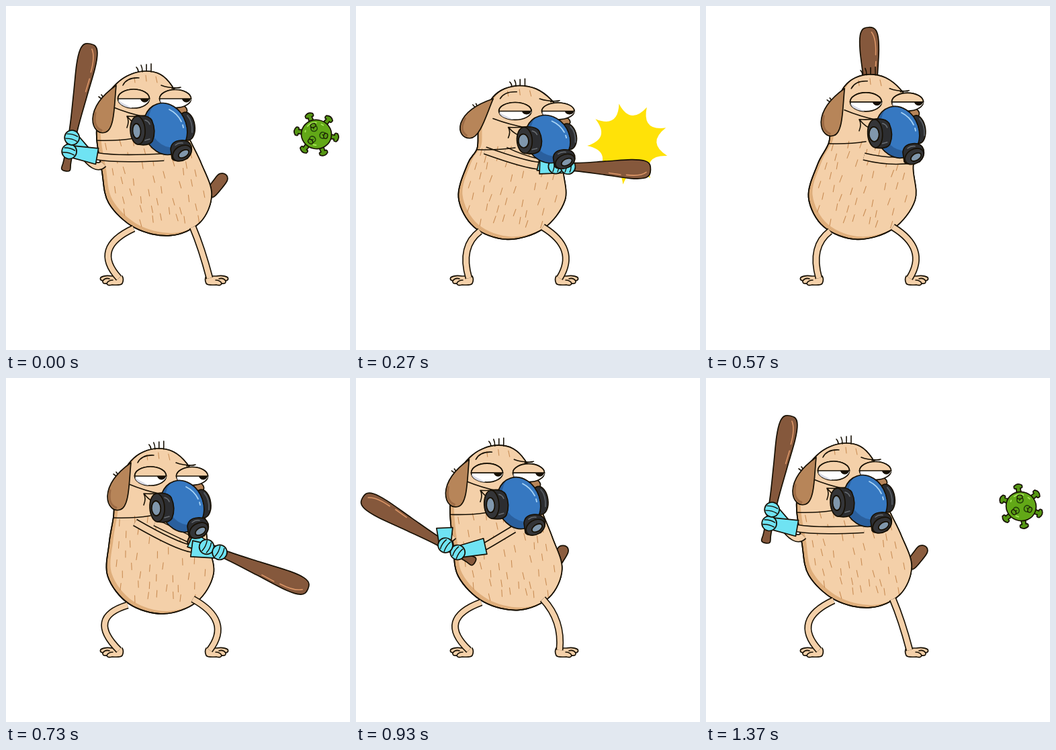
Animation, 512 px wide and 512 px high, one loop 1.41 s. Source, as an HTML page with a canvas:

```html
<!DOCTYPE html>
<html lang="en">
<head>
<meta charset="utf-8">
<title>Batter</title>
<style>
html, body { margin: 0; width: 100%; height: 100%; overflow: hidden; background: #fff; }
canvas { display: block; width: 100vw; height: 100vh; }
</style>
</head>
<body>
<canvas id="stage" width="512" height="512"></canvas>
<script>
const ctx = document.getElementById('stage').getContext('2d');
const LOOP = 1410, RAD = Math.PI / 180;
const INK = '#171004', SKIN = '#f4d0a9', SHADE = '#dfae7b', FUR = '#c98d55';
const BAT = '#85583c', EAR = '#b78559', GLOVE = '#6fe3f3', RUBBER = '#2c2d30', GLASS = '#8097ac';

// time, head shift, crouch, squash, bat angle; the rest of the pose follows from these
const POSES = [
  [0, 0, 0, 0, 79],
  [170, 21, 1, 1, 203],
  [370, 66, .2, 0, 466],
  [570, 48, .6, 0, 452],
  [730, 25, 1, 0, 337.5],
  [930, 5, .4, 0, 150],
  [1080, 0, 0, 0, 79],
  [LOOP, 0, 0, 0, 79]];

// monotone cubic through the poses
function poseAt(t) {
  let i = 0;
  while (i < POSES.length - 2 && t >= POSES[i + 1][0]) i++;
  const a = POSES[i], b = POSES[i + 1], h = b[0] - a[0], u = (t - a[0]) / h, w = 1 - u;
  const slope = (k, c) => POSES[k] && POSES[k + 1]
    ? (POSES[k + 1][c] - POSES[k][c]) / (POSES[k + 1][0] - POSES[k][0]) : 0;
  const tangent = (k, c) => {
    const p = slope(k - 1, c), q = slope(k, c);
    return p * q > 0 ? 2 * p * q / (p + q) : 0;
  };
  const [dx, crouch, squash, phi] = [1, 2, 3, 4].map(c =>
    a[c] * w * w * (1 + 2 * u) + b[c] * u * u * (3 - 2 * u)
    + h * u * w * (w * tangent(i, c) - u * tangent(i + 1, c)));
  const bat = {
    x: 275 - .00253 * (phi - 350) ** 2,
    y: 288 - .18 * (phi - 79) - 46 * Math.exp((79 - phi) / 25),
    angle: -phi * RAD,
    scale: 1 - .27 * squash
  };
  return {
    dx, crouch, squash, bat, lean: dx / 66, dy: 8 * crouch + 27 * squash,
    sx: 1 + .06 * squash, sy: 1 - .15 * squash, behind: phi > 400, reach: ramp(bat.x, 225, 270)
  };
}

function ramp(v, from, to) {
  const u = Math.min(1, Math.max(0, (v - from) / (to - from)));
  return u * u * (3 - 2 * u);
}
const mix = (a, b, u) => a + (b - a) * u;
const mixPoint = (p, q, u) => [mix(p[0], q[0], u), mix(p[1], q[1], u)];
function toward(p, q, d) {
  return mixPoint(p, q, d / (Math.hypot(q[0] - p[0], q[1] - p[1]) || 1));
}
const along = (bat, d) => [
  bat.x + Math.cos(bat.angle) * d * bat.scale,
  bat.y + Math.sin(bat.angle) * d * bat.scale];

function blob(pts) {
  const p = new Path2D(), n = pts.length, g = i => pts[(i + n) % n];
  p.moveTo(...pts[0]);
  for (let i = 0; i < n; i++) {
    const [a, b, c, d] = [g(i - 1), g(i), g(i + 1), g(i + 2)];
    p.bezierCurveTo(b[0] + (c[0] - a[0]) / 6, b[1] + (c[1] - a[1]) / 6,
      c[0] - (d[0] - b[0]) / 6, c[1] - (d[1] - b[1]) / 6, ...c);
  }
  p.closePath();
  return p;
}
function paint(path, fill, width = 1.7) {
  if (fill) { ctx.fillStyle = fill; ctx.fill(path); }
  if (width) { ctx.strokeStyle = INK; ctx.lineWidth = width; ctx.stroke(path); }
}
function oval(x, y, rx, ry, deg, fill, width, from = 0, to = 360) {
  const p = new Path2D();
  p.ellipse(x, y, rx, ry, deg * RAD, from * RAD, to * RAD);
  if (to - from < 360) p.closePath();
  paint(p, fill, width);
}
function line(d, color = INK, width = 1.6) {
  ctx.strokeStyle = color;
  ctx.lineWidth = width;
  ctx.stroke(new Path2D(d));
}
function tube(a, b, c, width) {
  const d = `M${a}Q${b} ${c}`;
  ctx.lineCap = 'butt';
  line(d, INK, width);
  line(d, SKIN, width - 3.2);
  ctx.lineCap = 'round';
}
function within(draw) { ctx.save(); draw(); ctx.restore(); }
function shifted(x, y, draw) {
  within(() => { ctx.translate(x, y); draw(); });
}

function drawBat(bat) {
  shifted(bat.x, bat.y, () => {
    const s = bat.scale;
    ctx.rotate(bat.angle);
    const side = [[-2, 6], [12, 5.5], [60, 6], [110, 10], [155, 14], [178, 13], [188, 7]];
    const edge = k => side.map(([x, y]) => [x * s, y * k]);
    paint(blob([...edge(-1), ...edge(1).reverse()]), BAT);
    line(`M${148 * s} 9Q${172 * s} 11 ${182 * s} 4M${118 * s} 7L${138 * s} 9`, '#dc9667');
  });
}

function drawGlove(wrist, hand) {
  const a = Math.atan2(hand[1] - wrist[1], hand[0] - wrist[0]);
  const off = (p, k) => [p[0] - Math.sin(a) * k, p[1] + Math.cos(a) * k];
  paint(new Path2D(`M${off(wrist, 12)}L${off(hand, 9)}L${off(hand, -8)}L${off(wrist, -12)}Z`), GLOVE);
}
function drawFists(bat) {
  shifted(bat.x, bat.y, () => {
    ctx.rotate(bat.angle);
    for (const d of [26, 47]) {
      const x = d * bat.scale;
      oval(x, 0, 11, 11, 0, GLOVE);
      line(`M${x - 3} -9Q${x - 1} 0 ${x - 4} 8M${x + 4} -8Q${x + 6} 0 ${x + 3} 8`, INK, 1.4);
    }
  });
}

// shoulders and elbows move with the reach; wrists trail the hands on the bat
function armsOf({ bat, reach, squash }) {
  const handA = along(bat, mix(26, 47, reach)), handB = along(bat, mix(47, 26, reach));
  const shoulderA = [mix(235, 192, reach), mix(225, 215, reach)];
  const shoulderB = [mix(145, 222, reach), mix(235, 215, reach)];
  const elbowA = mixPoint(shoulderA, handA, .5);
  elbowA[1] += 8 + 6 * reach - 8 * squash;
  const elbowB = [shoulderB[0] + mix(-12 - 30 * squash, 24, reach), shoulderB[1] + 12];
  return [
    [shoulderB, elbowB, toward(handB, elbowB, 26), handB],
    [shoulderA, elbowA, toward(handA, elbowA, 42), handA]];
}

function drawFoot() {
  paint(new Path2D('M163 402Q160 402 158 402Q147 400 141 404Q139 408 144 409Q143 414 150 413'
    + 'Q151 417 158 415Q171 416 173 413Q176 407 173 402'), SKIN);
  line('M144 409Q148 404 154 406M150 413Q152 408 159 408');
}
function drawLegs({ lean, crouch }) {
  const leg = (hip, knee, ankle) => {
    const bend = [0, 1].map(i => 2 * knee[i] - (hip[i] + ankle[i]) / 2);
    tube(hip, bend, ankle, 11);
  };
  drawFoot();
  within(() => { ctx.translate(471, 0); ctx.scale(-1, 1); drawFoot(); });
  leg([190 - 9 * crouch, 331 + 7 * crouch], [153 + 32 * lean - 18 * crouch, 364], [168, 405]);
  leg([278, 329], [291 + 12 * lean + 18 * crouch, 364], [303, 405]);
}

// skull from the right ear round to the neck, then the belly as part of a sheared ellipse
function bodyOutline({ dx, dy, sx, sy, lean, crouch }) {
  const skull = [[270, 190], [262, 150], [247, 119], [230, 102], [208, 97], [185, 102],
    [165, 115], [147, 138], [137, 165], [135, 198]];
  const top = skull.map(([x, y]) => [
    210 + dx + (x - 210) * sx - dx * .25 * Math.max(0, (140 - y) / 43),
    140 + dy + (y - 140) * sy]);
  const belly = Array.from({ length: 7 }, (_, i) => {
    const a = mix(197 + 18 * lean, -27, i / 6) * RAD, y = 75 * Math.sin(a);
    return [224 + 13 * lean + 81 * Math.cos(a) + (.18 - .36 * lean) * y, 267 + 9 * crouch + y];
  });
  return [...top, ...belly];
}

function drawFur(out, lean) {
  const left = out.slice(9, 13), right = [out[0], out[16], out[15], out[14]];
  const edge = (e, v) => {
    const i = Math.min(2, Math.floor(v));
    return mixPoint(e[i], e[i + 1], v - i);
  };
  let d = '';
  for (let r = 0; r < 8; r++) for (let c = 0; c < 6; c++) {
    const v = .25 + r * .36 + Math.sin(c * 5.1 + r) * .1;
    const u = (c + .5 + (r % 2) * .45 + Math.sin(c * 3 + r * 7) * .15) / 6.4;
    const [x, y] = mixPoint(edge(left, v), edge(right, v), u);
    d += `M${x} ${y - 5}l${2 - 6.6 * lean + Math.sin(r * 3 + c * 2)} 10`;
  }
  line(d, FUR, 1.1);
}

function drawEye(x, y, rx, ry) {
  oval(x, y, rx, ry, 0, '#fff');
  oval(x, y, rx, ry, 0, '#d9dbe6', 0, 95, 170);
  oval(x + 1.5, y - 1, rx - 1, ry - 2.5, 0, '#fff', 0);
  oval(x + rx - 7, y, 6, 5, 0, INK, 1, 0, 180);
  oval(x, y, rx, ry, 0, SKIN, 1.7, 180, 360);
}

function drawMask(dx) {
  oval(269 - dx * .05, 179, 12, 21, -8, RUBBER);
  line('M270 163Q278 172 277 188', '#555a60', 2);
  oval(237, 183, 32, 39, -18, '#2a5f9d');
  within(() => {
    const p = new Path2D();
    p.ellipse(237, 183, 31, 38, -18 * RAD, 0, 7);
    ctx.clip(p);
    oval(244, 174, 31, 37, -18, '#3678c1', 0);
  });
  line('M243 154Q255 160 261 172M263 177L264 181', '#a9d4f5', 1.8);

  shifted(dx * .16, 0, () => {
    paint(new Path2D('M194 164Q211 161 217 170Q224 186 218 201Q213 209 196 206Z'), RUBBER);
    oval(196, 185, 11, 21, -3, '#343538');
    oval(194.5, 186, 6 + dx * .03, 11, -3, GLASS, 1.8);
    line('M207 170Q212 171 214 176M207 200L214 198', '#686d72');
  });

  paint(new Path2D('M245 213Q246 201 260 200Q273 199 276 209Q278 219 270 227Q252 234 247 227Z'), RUBBER);
  oval(262, 219, 15, 10.5, -32, '#343538');
  oval(264.5, 220, 8.5, 5, -32, GLASS, 1.8);
  line('M252 207Q257 203 263 204', '#686d72');
}

function drawFace({ dx, dy, sx, sy, squash }) {
  within(() => {
    ctx.translate(210 + dx, 140 + dy);
    ctx.scale(sx, sy);
    ctx.translate(-210, -140);
    shifted(-dx * .25, 0, () => {
      line('M197 98Q197 94 194 91M203 98Q203 92 201 88M209 97V87M216 98V86');
      line('M191 106l1 8M208 103l1 9M223 105l2 9', FUR, 1.1);
    });
    shifted(-dx * .12, 0, () => {
      line('M174 118Q180 106 198 107M231 118Q240 122 258 122M247 123L260 121');
    });
    line('M158 150Q182 160 207 165M135 200Q165 201 190 197');
    shifted(164 - dx * .12, 118, () => {
      ctx.rotate(30 * squash * RAD);
      line('M-26 17l8 6M-22 14l5 7');
      paint(new Path2D('M0 0C-14 10 -34 28 -35 50C-35 66 -25 73 -16 70C-2 66 -3 28 0 0Z'), EAR);
      line('M-31 41Q-35 62 -22 67', '#9c6b45', 3);
    });
    oval(262, 154, 8, 6, 30, EAR);
    drawEye(190, 138, 23.5, 14);
    drawEye(252, 138, 23.5, 13.5);
    line('M207 163Q194 165 180 164Q184 171 180 181M181 165Q190 176 199 178');
    drawMask(dx);
  });
}

function drawTail(lean) {
  shifted(316 - 169 * lean, 265 + 11 * lean, () => {
    ctx.rotate((-52 - 86 * lean) * RAD);
    paint(blob([[-20, -7], [0, -9], [13, -8], [18, 0], [13, 7], [0, 8], [-20, 6]]), '#8b5d3f');
  });
}

function drawVirus(t) {
  if (t > 250 && t < 900) return;
  const coming = t > 800;
  const x = coming ? 462 + .175 * (LOOP - t) : 462 - .206 * t;
  const turn = coming ? (LOOP - t) * .3 : -t * .34;
  shifted(x, 191, () => {
    ctx.rotate((turn + 9) * RAD);
    for (let i = 0; i < 6; i++) {
      paint(new Path2D('M19 -3.5L27 -3Q26 -7 31 -6Q36 0 31 6Q26 7 27 3L19 3.5Z'), '#559713');
      ctx.rotate(Math.PI / 3);
    }
    oval(0, 0, 22.5, 21.5, 0, '#62a817');
    line('M-15 -10Q-10 -17 -3 -17M5 -16l3 1M-17 -3v2M-2 16l4 0', '#a9e85a', 1.8);
    for (let i = 0; i < 3; i++) {
      ctx.rotate(2.1);
      line('M13 -4Q6 -7 5 0Q6 6 12 4M9 -1L13 1', '#24450a');
      oval(14, 0, 3, 4, 0, '#559713', 1.2);
    }
  });
}

function star(r, dent, tips = 9) {
  const point = (d, a) => [405 + d * Math.cos(a), 205 + d * Math.sin(a)];
  let d = '';
  for (let i = 0; i <= tips; i++) {
    const a = i * 2 * Math.PI / tips + .3, p = point(r, a);
    d += i ? `Q${point(r * dent, a - Math.PI / tips)} ${p}` : `M${p}`;
  }
  return d + 'Z';
}
// a filled star opens up, then only its lower rim is left
function drawBurst(t) {
  if (t < 260 || t > 430) return;
  ctx.fillStyle = '#ffe208';
  if (t < 340) {
    const u = (t - 260) / 80, r = 55 + 48 * u;
    ctx.fill(new Path2D(star(r, .45) + (u > .4 ? star(r * u * .8, .55) : '')), 'evenodd');
  } else {
    ctx.fill(new Path2D('M305 322Q350 208 368 295Q400 217 440 258Q449 162 506 244'
      + 'Q460 172 444 256Q447 267 456 284Q390 224 369 338Q366 290 350 278Q330 272 305 322Z'));
  }
}

function drawTrail(t) {
  if (t < 120 || t > 210) return;
  let d = '';
  for (let ago = 56; ago >= 0; ago -= 7) d += (d ? 'L' : 'M') + along(poseAt(t - ago).bat, 186);
  line(d, INK, 1.8);
}

function draw(t) {
  ctx.clearRect(0, 0, 512, 512);
  ctx.lineCap = ctx.lineJoin = 'round';
  const pose = poseAt(t), { bat, lean, behind } = pose;
  const out = bodyOutline(pose), body = blob(out), arms = armsOf(pose);
  const club = () => {
    drawBat(bat);
    for (const [, , wrist, hand] of arms) drawGlove(wrist, hand);
    drawFists(bat);
  };

  drawVirus(t);
  drawBurst(t);
  drawTrail(t);
  drawTail(lean);
  if (behind) drawBat(bat);

  paint(body, SHADE);
  within(() => {
    ctx.clip(body);
    shifted(6, -4, () => paint(body, SKIN, 0));
    drawFur(out, lean);
  });
  paint(body, null);
  drawLegs(pose);

  if (behind) {
    within(() => {
      ctx.clip(body);
      tube([235, 224], [275, 234], [262 + pose.dx, 228], 12);
    });
  } else {
    for (const [shoulder, elbow, wrist] of arms) tube(shoulder, elbow, wrist, 12);
    club();
  }
  drawFace(pose);
}

// thirty pictures a second, on a 10 ms clock
function tick(now) {
  const k = Math.min(41, Math.floor((now % LOOP + 3.4) * .03));
  draw(Math.round(k * 10 / 3) * 10);
  requestAnimationFrame(tick);
}
draw(0);
requestAnimationFrame(tick);
</script>
</body>
</html>
```
